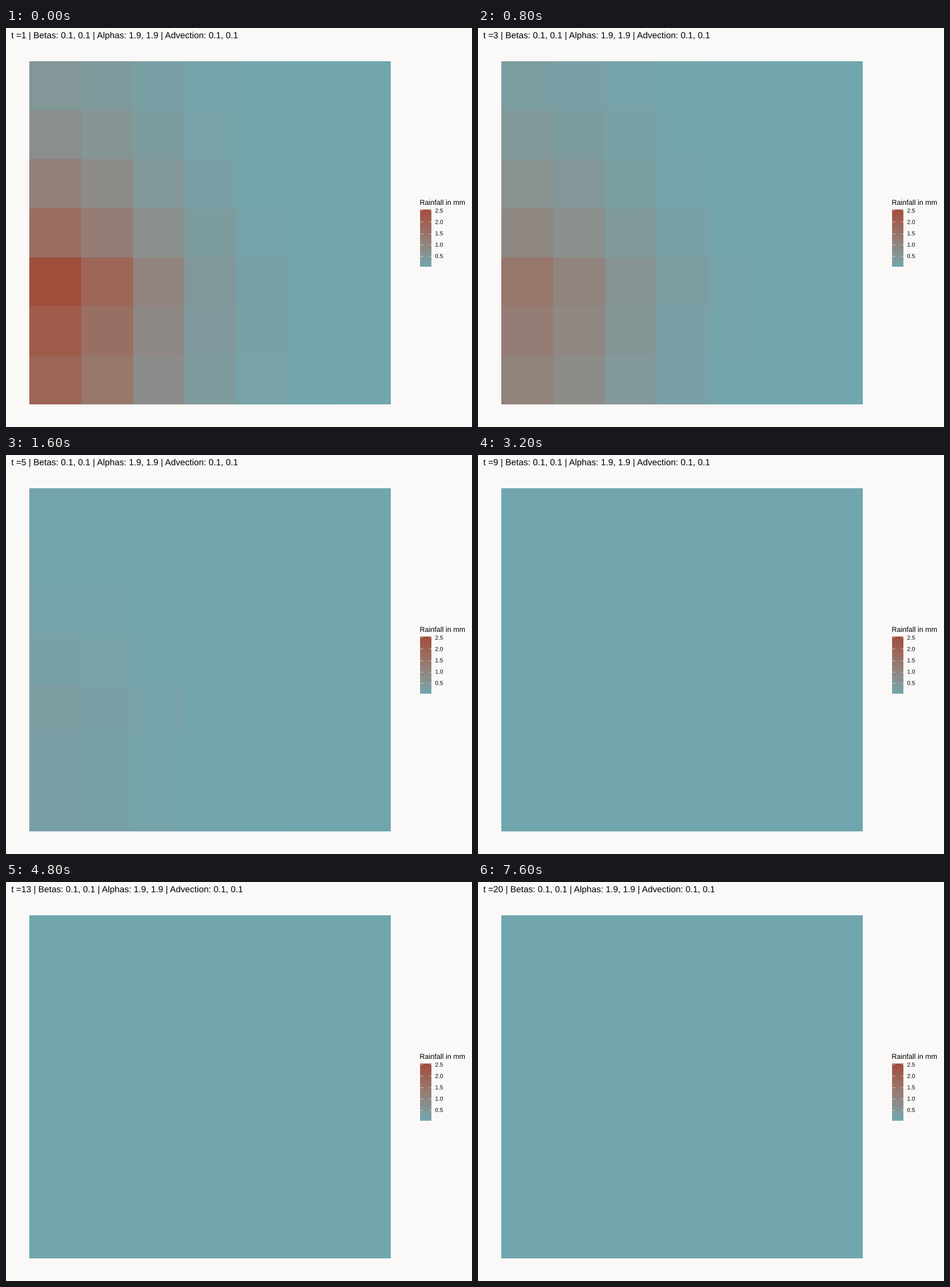
Recreate the animation shown at these times as a matplotlib script. Size 700 px wide and 600 px high, loop 8 s.

```python
import numpy as np
import matplotlib.pyplot as plt
from matplotlib.animation import FuncAnimation
from matplotlib.patches import PathPatch
from matplotlib.textpath import TextPath
from matplotlib.transforms import Affine2D

W, H = 700, 600
STEPS, INTERVAL = 20, 400
CELLS = 7
STORM_ROW, PEAK = 4, 2.53
BACKGROUND = "#FAF9F7"
LOW, HIGH = (113, 166, 174), (160, 78, 60)

plt.rcParams["font.family"] = "Liberation Sans"

# sRGB (D65) <-> CIE Lab
TO_XYZ = np.array([[0.4124, 0.3576, 0.1805],
                   [0.2126, 0.7152, 0.0722],
                   [0.0193, 0.1192, 0.9505]])
WHITE = TO_XYZ.sum(axis=1)
TO_LAB = np.array([[0, 116, 0], [500, -500, 0], [0, 200, -200]])


def rgb_to_lab(rgb):
    c = np.array(rgb) / 255
    linear = np.where(c > 0.04045, ((c + 0.055) / 1.055) ** 2.4, c / 12.92)
    return TO_LAB @ np.cbrt(TO_XYZ @ linear / WHITE)


def lab_to_rgb(lab):
    xyz = (lab @ np.linalg.inv(TO_LAB).T) ** 3 * WHITE
    c = np.clip(xyz @ np.linalg.inv(TO_XYZ).T, 0, 1)
    return np.where(c > 0.0031308, 1.055 * c ** (1 / 2.4) - 0.055, 12.92 * c)


LAB_LOW, LAB_HIGH = rgb_to_lab(LOW), rgb_to_lab(HIGH)


def colour(rain):
    """Perceptual gradient from dry blue to wet red."""
    share = np.asarray(rain)[..., None] / PEAK
    return lab_to_rgb(LAB_LOW + share * (LAB_HIGH - LAB_LOW))


def rainfall(t):
    """Storm on the western edge, fading eastwards, faster north than south."""
    index = np.arange(CELLS)
    offset = index - STORM_ROW
    rows = np.exp(-np.where(offset < 0, 0.42, 0.14) * abs(offset))
    columns = np.exp(-0.3 * index ** 1.6)
    return PEAK * np.exp(-0.145 * (t - 1) ** 2) * np.outer(rows, columns)


fig = plt.figure(figsize=(W / 100, H / 100), dpi=100, facecolor=BACKGROUND)
ax = fig.add_axes([0, 0, 1, 1])


def label(x, baseline, text, size):
    place = Affine2D().scale(1, -1).translate(x, baseline) + ax.transData
    return ax.add_patch(PathPatch(TextPath((0, 0), text, size=size),
                                  transform=place, fc="black", lw=0))


def heading(t):
    return f"t ={t} | Betas: 0.1, 0.1 | Alphas: 1.9, 1.9 | Advection: 0.1, 0.1"


TITLE_SIZE = 13.25
title = label(7.9, 15.4, heading(1), TITLE_SIZE)

# Cell borders on whole pixels
steps = np.arange(CELLS + 1)
x_edges = np.floor(35.9 + steps * 543 / CELLS)
y_edges = np.floor(50.3 + steps * 516 / CELLS)
cells = ax.pcolormesh(x_edges, y_edges, colour(rainfall(1)),
                      edgecolors="none", antialiased=False)

# Colour bar
BAR_LEFT, BAR_RIGHT, BAR_TOP, BAR_BOTTOM = 622, 639, 273, 359
label(621.4, 266, "Rainfall in mm", 10.8)
ax.imshow(colour(np.linspace(PEAK, 0, 86)[:, None]), aspect="auto",
          extent=(BAR_LEFT, BAR_RIGHT, BAR_BOTTOM, BAR_TOP))
for value in np.arange(0.5, PEAK, 0.5):
    y = BAR_TOP + 0.4 + (PEAK - value) * 34.1
    for x in (BAR_LEFT, BAR_RIGHT - 3.5):
        ax.plot([x, x + 3.5], [y, y], color="white", lw=0.4,
                solid_capstyle="butt")
    label(644.5, y + 3.2, f"{value:.1f}", 8.7)

ax.set(xlim=(0, W), ylim=(H, 0))
ax.axis("off")


def update(frame):
    t = frame + 1
    title.set_path(TextPath((0, 0), heading(t), size=TITLE_SIZE))
    cells.set_array(colour(rainfall(t)))
    return title, cells


animation = FuncAnimation(fig, update, frames=STEPS, interval=INTERVAL,
                          repeat=True, repeat_delay=0)
plt.show()
```
